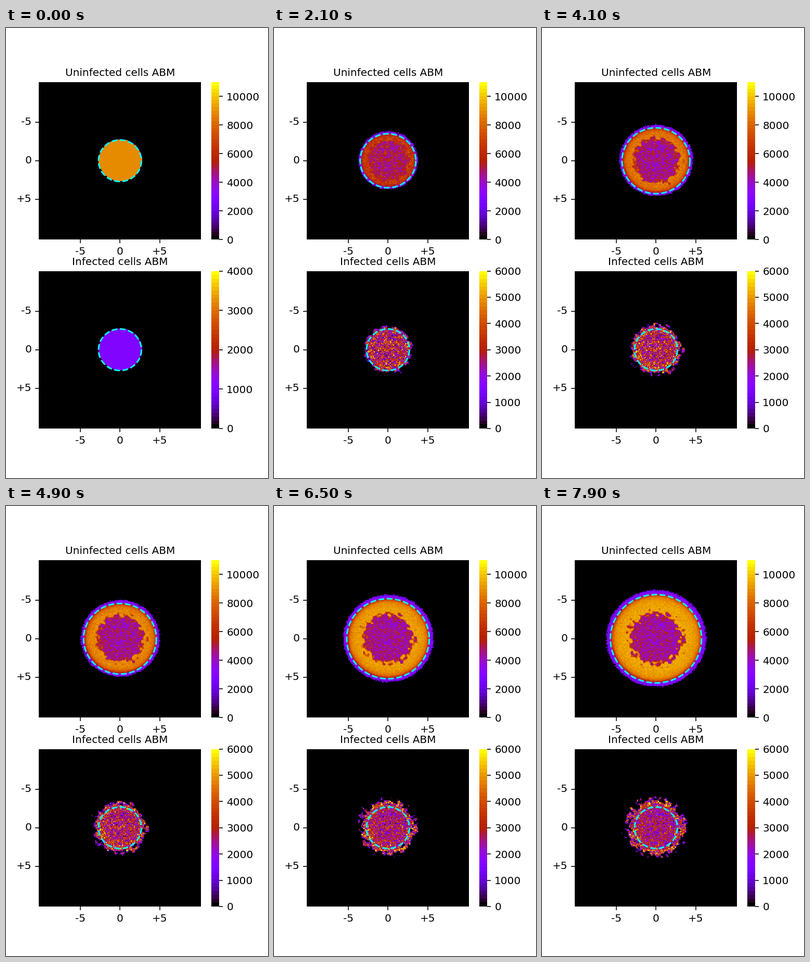
These frames come from a looping animation (504 px wide and 864 px high, 8000 ms). A matplotlib script:

```python
import numpy as np
import matplotlib.pyplot as plt
from matplotlib.animation import FuncAnimation
from matplotlib.colors import ListedColormap
from matplotlib.ticker import MultipleLocator

FRAMES, STEP = 80, 100
LIMIT = 10.2         # half width of the axes
HALF, N = 8, 160     # half width and cell count of the simulated patch
R0 = 2.69

plt.rcParams["font.family"] = "DejaVu Sans"
rng = np.random.default_rng(7)

axis = (np.arange(N) + 0.5) * 2 * HALF / N - HALF
X, Y = np.meshgrid(axis, axis)
R = np.hypot(X, Y)
theta = np.linspace(0, 2 * np.pi, 400)


def blur(a, k=1):
    for ax in (0, 1):
        a = sum(np.roll(a, s, ax) for s in range(-k, k + 1))
    return a / a.std()


def make_noise():
    """Gaussian noise whose cells drift slowly with time."""
    amp = np.sqrt(-2 * np.log(1 - rng.random((N, N))))
    phase = rng.uniform(0, 2 * np.pi, (N, N))
    speed = rng.uniform(-0.8, 0.8, (N, N))
    return lambda t: amp * np.cos(phase + speed * t)


noise_a, noise_b, noise_edge = make_noise(), make_noise(), make_noise()
patches = blur(rng.normal(size=(N, N)))
rough = blur(blur(rng.normal(size=(N, N))))

# One long finger of the infected front on the left
finger = np.exp(-((X + 4.4) ** 2 + (Y - 0.7) ** 2) / 0.06)


def rise(t, tau):
    return 1 - np.exp(-t / tau)


def hump(t, peak):
    """Rises from 0 to 1 at the peak time, then decays."""
    return t / peak * np.exp(1 - t / peak)


def radius(t):
    return R0 + 0.3836 * t


def depth(t):
    """Distance inside the ragged infected front."""
    front = 2.65 + 0.115 * t
    grow = np.clip((t - 1.5) / 6, 0, 1)
    return front - R + (0.1 + 0.021 * t) * rough + 1.15 * grow * finger


def uninfected(t):
    if t == 0:
        return np.where(R < R0, 8950, 0)
    a, b, e = noise_a(t), noise_b(t), noise_edge(t)
    gap = R - radius(t)

    shoulder = 1 - 0.18 * np.exp(np.minimum(gap, 0) / 0.5)
    ring = (9500 - 2800 * hump(t, 1.2)) * shoulder
    ring += (200 + 550 * hump(t, 1)) * a
    core = 8950 - 4650 * rise(t, 1.1)
    core += 1000 * rise(t, 0.5) * (0.85 * a + 0.5 * patches)
    mix = np.clip((depth(t) - 0.05) / 0.45, 0, 1)

    width = 0.04 + 0.1 * rise(t, 2)
    fall = 1 / (1 + np.exp(np.clip((gap - 0.02) / width, -50, 50)))
    body = (ring * (1 - mix) + core * mix) * fall

    reach = 0.12 * rise(t, 0.2) + 0.052 * t
    skirt = 3500 - 1300 * np.clip(gap / reach, 0, 1) + 400 * b
    field = np.maximum(body, skirt)
    return np.where(gap < reach + 0.05 * e * rise(t, 0.5), field, 0)


def infected(t):
    if t == 0:
        return np.where(R < R0, 1000, 0)
    a, b = noise_b(t), noise_edge(t)
    d = depth(t) + 0.06 + 0.06 * rise(t, 0.5) * b
    ramp = np.clip(0.25 + d / (0.27 + 0.35 * np.exp(-t / 1.5)), 0, 1)
    boost = 1100 * np.clip((t - 2.5) / 4, 0, 1) * np.exp(-(d - 0.45) ** 2 / 0.14)
    swell = hump(t, 2.4) ** 2
    level = 1000 + 1500 * rise(t, 1.2) + 800 * swell + boost
    spread = 850 * rise(t, 0.5) + 450 * swell + 0.5 * boost
    value = level + spread * (0.9 * a + 0.4 * patches)
    return np.where(d > 0, np.maximum(value, 300) * ramp, 0)


def make_panel(ax, title, top, bands, step):
    cmap = ListedColormap(plt.get_cmap("gnuplot")(np.linspace(0, 1, bands)))
    ax.set_facecolor("black")
    im = ax.imshow(np.zeros((N, N)), cmap=cmap, vmin=0, vmax=top,
                   extent=(-HALF, HALF, HALF, -HALF),
                   aspect="auto", interpolation="nearest")
    ring, = ax.plot([], [], "--", color="cyan", lw=1.5)
    ax.set(xlim=(-LIMIT, LIMIT), ylim=(LIMIT, -LIMIT))
    ax.set_title(title, fontsize=10)
    labels = ["-5", "0", "+5"]
    ax.set_xticks([-5, 0, 5], labels)
    ax.set_yticks([-5, 0, 5], labels, va="center")
    ax.spines[:].set_visible(False)
    bar = fig.colorbar(im, ax=ax, ticks=MultipleLocator(step))
    bar.outline.set_visible(False)
    return im, ring


def set_ring(line, r):
    line.set_data(r * np.cos(theta), r * np.sin(theta))


fig, (ax1, ax2) = plt.subplots(2, 1, figsize=(3.5, 6), dpi=144)
healthy, healthy_ring = make_panel(ax1, "Uninfected cells ABM", 11000, 44, 2000)
sick, sick_ring = make_panel(ax2, "Infected cells ABM", 4000, 40, 1000)
set_ring(sick_ring, R0)


def update(k):
    t = k * STEP / 1000
    healthy.set_data(uninfected(t))
    sick.set_data(infected(t))
    sick.set_clim(0, 4000 if k == 0 else 6000)
    set_ring(healthy_ring, radius(t))
    return healthy, sick, healthy_ring


anim = FuncAnimation(fig, update, frames=FRAMES, interval=STEP,
                     repeat=True, repeat_delay=0, blit=False)
plt.show()
```
